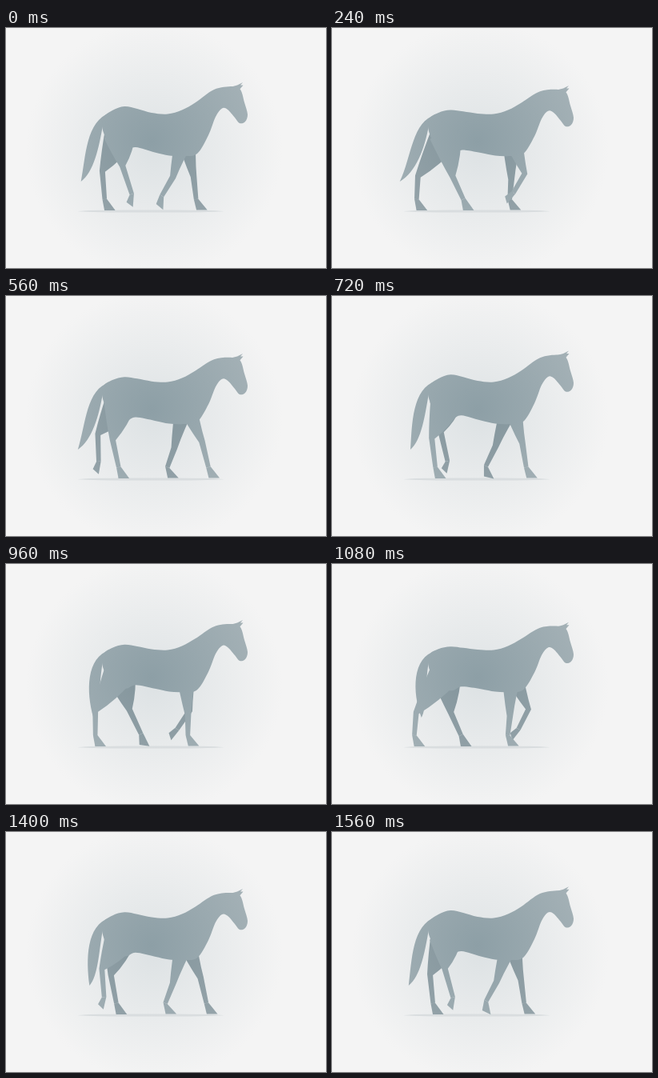
Recreate the animation shown at these times as an HTML page with a canvas. Size 400 px wide and 300 px high, loop 1.6 s.

```html
<!DOCTYPE html>
<html lang="en">
<head>
<meta charset="utf-8">
<title>Walking horse</title>
<style>
  html, body { margin: 0; width: 100%; height: 100%; overflow: hidden; background: #f4f4f4; }
  canvas { display: block; width: 400px; height: 300px; }
</style>
</head>
<body>
<canvas id="stage" width="400" height="300"></canvas>
<script>
const ctx = document.getElementById('stage').getContext('2d');
const LOOP = 1600, STEP = 40;
const HELD_STEPS = [15, 25, 30];

const wave = (time, peak, cycles = 1) => Math.cos((time - peak) / LOOP * 2 * Math.PI * cycles);
const smooth = u => { u = Math.max(0, Math.min(1, u)); return u * u * (3 - 2 * u); };

// "off" and "on" are the times the hoof leaves and meets the ground;
// each reach is the rearmost and foremost x of a joint.
const HIND = {
  off: 1120, on: 1800, jointLead: 0, fetlockReach: [100, 167], jointReach: [103, 153],
  jointY: (time, fetlockY) => fetlockY - 32 + 4 * wave(time, 300, 2),
  pivot: [142, 135], top: 20, midFront: 15, midBack: 12, joint: 3.7,
  rest: 0.44, flex: 0.8
};
const FORE = {
  off: 1480, on: 2160, jointLead: 140, fetlockReach: [194, 253], jointReach: [205, 251],
  jointY: time => 186 - 5 * wave(time, 420),
  pivot: [225, 133], top: 13, midFront: 6, midBack: 9, joint: 3.8,
  rest: 0.49, flex: 1.3
};
const BODY = [
  [121, 113], [133, 103], [148, 98], [164, 101], [182, 106], [202, 107.5], [220, 102.5],
  [237, 93], [260, 77], [283, 73], [293, 77], [298, 93], [302, 108], [299, 117],
  [292, 119], [286, 112], [277, 102], [270, 100.5], [262, 111], [253, 134], [239, 157],
  [222, 160], [204, 159.5], [186, 155.5], [162, 149], [150, 153], [134, 150], [122, 131]
];
const EARS = [[280, 74], [289, 71.5], [296, 68], [293, 71.5], [296.5, 71.5], [291, 78]];

function glow(x, y, r, inner, outer) {
  const g = ctx.createRadialGradient(x, y, 0, x, y, r);
  g.addColorStop(0, inner);
  g.addColorStop(1, outer);
  return g;
}
const BACKDROP = glow(185, 152, 160, '#dde2e4', '#f4f4f4');
const NEAR = glow(182, 142, 135, '#8d9fa6', '#a4b1b6');
const FAR = glow(182, 142, 135, '#82949b', '#98a6ac');

function polygon(points) {
  ctx.beginPath();
  points.forEach(p => ctx.lineTo(...p));
  ctx.closePath();
  ctx.fill();
}

function smoothShape(points) {
  const n = points.length, at = i => points[(i + n) % n];
  ctx.beginPath();
  ctx.moveTo(...points[0]);
  for (let i = 0; i < n; i++) {
    const [a, b, c, d] = [at(i - 1), at(i), at(i + 1), at(i + 2)];
    ctx.bezierCurveTo(b[0] + (c[0] - a[0]) / 6, b[1] + (c[1] - a[1]) / 6,
      c[0] - (d[0] - b[0]) / 6, c[1] - (d[1] - b[1]) / 6, ...c);
  }
  ctx.fill();
}

// Progress of the swing; above 1 the hoof stands on the ground.
const swingProgress = (time, off, on) => ((time - off) % LOOP + LOOP) % LOOP / (on - off);

// Steady backward slide while standing, then an eased swing that keeps its speed at both ends.
function stride(time, [back, front], off, on) {
  const u = swingProgress(time, off, on);
  const slide = (front - back) * (on - off) / (LOOP - (on - off));
  if (u >= 1) return front - slide * (u - 1);
  return back + (front - back) * smooth(u) - slide * u * (1 - u) * (1 - 2 * u);
}

// Unit vector pointing to the front side of a limb segment.
function normal(a, b) {
  const dx = b[0] - a[0], dy = b[1] - a[1], len = Math.hypot(dx, dy);
  return [dy / len, -dx / len];
}
const offset = (p, n, d) => [p[0] + n[0] * d, p[1] + n[1] * d];

function drawLeg(leg, time, color) {
  const { off, on, pivot } = leg;
  const lift = Math.sin(Math.PI * Math.min(1, swingProgress(time, off, on)));
  const fetlock = [stride(time, leg.fetlockReach, off, on), 214 - 8 * lift];
  const joint = [stride(time, leg.jointReach, off, on - leg.jointLead), leg.jointY(time, fetlock[1])];
  const mid = offset(pivot, [joint[0] - pivot[0], joint[1] - pivot[1]], 0.56);
  const upper = normal(pivot, joint), lower = normal(joint, fetlock);
  const bend = [(upper[0] + lower[0]) / 2, (upper[1] + lower[1]) / 2];
  const side = (s, belly) => [offset(pivot, upper, s * leg.top), offset(mid, upper, s * belly),
    offset(joint, bend, s * leg.joint), offset(fetlock, lower, s * 2.8)];
  const front = side(1, leg.midFront), back = side(-1, leg.midBack);

  ctx.fillStyle = color;
  ctx.beginPath();
  ctx.moveTo(...front[0]);
  ctx.quadraticCurveTo(...front[1], ...front[2]);
  ctx.lineTo(...front[3]);
  ctx.lineTo(...back[3]);
  ctx.lineTo(...back[2]);
  ctx.quadraticCurveTo(...back[1], ...back[0]);
  ctx.fill();

  // The pastern folds back during the swing and turns the sole with it.
  const turn = leg.flex * lift, pastern = leg.rest - turn;
  const hoof = offset(fetlock, [Math.sin(pastern), Math.cos(pastern)], 15.4 - 2.5 * lift);
  const sole = [Math.cos(turn), Math.sin(turn)], half = 6.8 - 2.2 * lift;
  polygon([front[3], offset(hoof, sole, half), offset(hoof, sole, -half), back[3]]);
}

function drawTail(time, settle) {
  const x = 98 + 14 * wave(time, 1120), y = 192;
  ctx.beginPath();
  ctx.moveTo(...settle([130, 106]));
  ctx.bezierCurveTo(100, 116, 100, 160, x, y);
  ctx.bezierCurveTo(x * 0.5 + 63, 180, 116, 150, 121, 122);
  ctx.lineTo(130, 118);
  ctx.fill();
}

// Croup and head sink and rise twice per loop.
function drawBody(time) {
  const rear = 3 * (1 - wave(time, -30, 2)), head = 3 * (1 - wave(time, 0, 2));
  const settle = ([x, y]) =>
    [x, y + rear * Math.exp(-(((x - 150) / 25) ** 2)) + head * smooth((x - 230) / 55)];
  ctx.fillStyle = NEAR;
  drawTail(time, settle);
  smoothShape(BODY.map(settle));
  polygon(EARS.map(settle));
}

function draw(time) {
  ctx.fillStyle = BACKDROP;
  ctx.fillRect(0, 0, 400, 300);
  ctx.fillStyle = '#d9dddf';
  ctx.beginPath();
  ctx.ellipse(181, 229, 91, 1.6, 0, 0, 2 * Math.PI);
  ctx.fill();
  drawLeg(HIND, time + LOOP / 2, FAR);
  drawLeg(FORE, time + LOOP / 2, FAR);
  drawBody(time);
  drawLeg(HIND, time, NEAR);
  drawLeg(FORE, time, NEAR);
}

function tick() {
  let step = Math.floor(performance.now() % LOOP / STEP);
  if (HELD_STEPS.includes(step)) step--;
  draw(step * STEP);
  requestAnimationFrame(tick);
}
tick();
</script>
</body>
</html>
```
